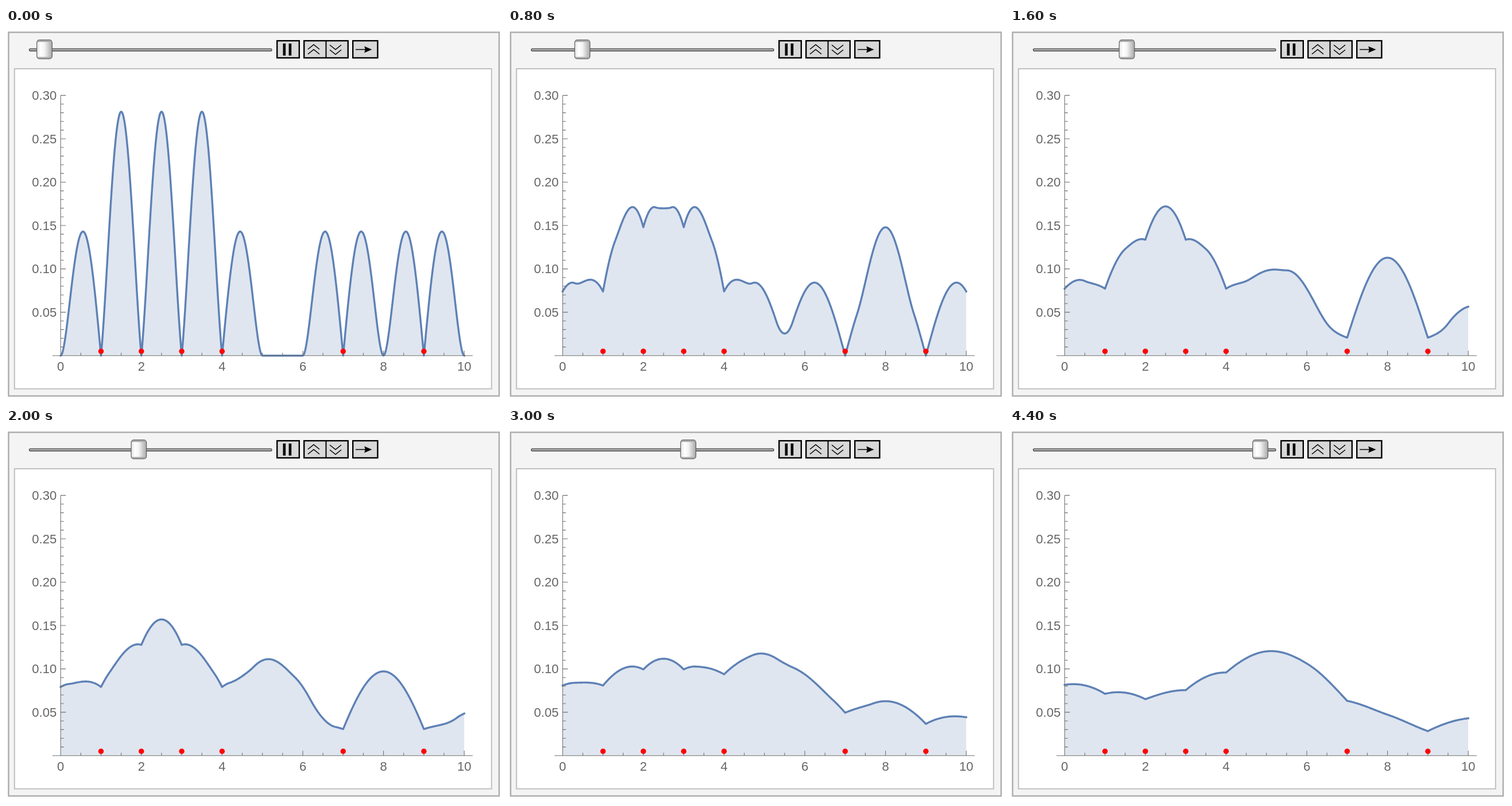
Write an HTML page that moves like this. It is 864 px wide and 648 px high and loops after 4.5 s.

```html
<!DOCTYPE html>
<html lang="en">
<head>
<meta charset="utf-8">
<title>Kernel density</title>
<style>
  html, body { margin: 0; width: 100%; height: 100%; overflow: hidden; background: #fff; }
  svg { display: block; width: 864px; height: 648px; }
  text { font: 22px "Liberation Sans", Arial, sans-serif; fill: #666; }
</style>
</head>
<body>
<svg viewBox="0 0 864 648">
  <defs>
    <linearGradient id="knob">
      <stop offset="0" stop-color="#e2e2e2"/>
      <stop offset=".25" stop-color="#fff"/>
      <stop offset=".5" stop-color="#f4f4f4"/>
      <stop offset="1" stop-color="#a8a8a8"/>
    </linearGradient>
  </defs>

  <rect x="4.5" y="7.5" width="854.5" height="633.5" fill="#f4f4f4" stroke="#acacac" stroke-width="2.4"/>
  <rect x="14.8" y="71" width="831" height="557.5" fill="#fff" stroke="#c0c0c0" stroke-width="2"/>

  <rect x="40.5" y="36.2" width="422.5" height="3.8" rx="1.9" fill="#b4b4b4" stroke="#444" stroke-width="1.3"/>
  <g id="thumb">
    <rect x="-13.3" y="20.8" width="26.6" height="33" rx="4.5" fill="#a9a9a9"/>
    <rect x="-13.3" y="24.2" width="26.6" height="26.2" rx="2.5" fill="url(#knob)"/>
    <rect x="-13.3" y="20.8" width="26.6" height="33" rx="4.5" fill="none" stroke="#555" stroke-width="1.1"/>
  </g>

  <g fill="#d8d8d8" stroke="#000" stroke-width="2.4">
    <rect x="472.2" y="22.2" width="38.6" height="29.8"/>
    <rect x="519.2" y="22.2" width="76.6" height="29.8"/>
    <rect x="604.2" y="22.2" width="43.2" height="29.8"/>
    <path d="M557.5 22V52" stroke-width="2"/>
  </g>
  <path d="M482.5 27h4.6v21h-4.6zM492.6 27h4.6v21h-4.6z"/>
  <path d="M526 37l10-8 10 8M526 45.5l10-8 10 8M564 29.5l10 8 10-8M564 38l10 8 10-8M609 37.5H630"
        fill="none" stroke="#000" stroke-width="1.6"/>
  <path d="M637.5 37.5L624 31.8Q627 37.5 624 43.2Z"/>

  <path id="area" fill="#dfe6f0"/>
  <path id="line" fill="none" stroke="#5e81b5" stroke-width="3.4" stroke-linejoin="round" stroke-linecap="square"/>
  <path id="axes" fill="none" stroke="#707070" stroke-width="1.1"/>
  <g id="labels"></g>
  <g id="dots" fill="#f00"></g>
</svg>

<script>
const data = [1, 2, 3, 4, 7, 9];
const px = x => 95.2 + 70.3 * x;
const py = y => 570.7 - 1511 * y;
const $ = id => document.getElementById(id);

// Thumb centre at some steps: [step, x]
const stops = [[0, 67], [7, 129.5], [15, 203.5], [22, 268.5], [27, 314], [35, 388], [40, 436]];

function add(parent, tag, attrs, text = "") {
  const el = document.createElementNS("http://www.w3.org/2000/svg", tag);
  for (const key in attrs) el.setAttribute(key, attrs[key]);
  el.textContent = text;
  $(parent).append(el);
}

function drawAxes() {
  let d = `M81 ${py(0)}H813M${px(0)} ${py(0)}V${py(0.3)}`;
  for (let i = 0; i <= 30; i++) {
    const major = i % 5 === 0;
    d += `M${px(0)} ${py(i / 100)}h${major ? 9 : 5.5}`;
    if (major && i) {
      add("labels", "text", { x: 88.2, y: py(i / 100) + 7.8, "text-anchor": "end" }, (i / 100).toFixed(2));
    }
  }
  for (let i = 0; i <= 20; i++) {
    const major = i % 4 === 0;
    d += `M${px(i / 2)} ${py(0)}v${major ? -8.5 : -5}`;
    if (major) add("labels", "text", { x: px(i / 2), y: 596.6, "text-anchor": "middle" }, i / 2);
  }
  $("axes").setAttribute("d", d);
  for (const x of data) add("dots", "circle", { cx: px(x), cy: py(0.005), r: 4.7 });
}

const kernel = u => Math.abs(u) < 1 ? 3 * Math.abs(u) * (1 - u * u) ** 2 : 0;

const density = (x, h) =>
  data.reduce((sum, c) => sum + kernel((x - c) / h), 0) / (data.length * h);

function thumbX(step) {
  const i = Math.max(1, stops.findIndex(s => s[0] >= step));
  const [a, xa] = stops[i - 1], [b, xb] = stops[i];
  return xa + (xb - xa) * (step - a) / (b - a);
}

function draw(step) {
  const h = 1 + step / 10;
  const points = [];
  for (let i = 0; i <= 500; i++) {
    const x = i / 50;
    points.push(px(x).toFixed(2) + " " + py(density(x, h)).toFixed(2));
  }
  const d = "M" + points.join("L");
  $("line").setAttribute("d", d);
  $("area").setAttribute("d", `${d}V${py(0)}H${px(0)}Z`);
  $("thumb").setAttribute("transform", `translate(${thumbX(step)} 0)`);
}

let shown = -1;
const start = performance.now();

function tick() {
  const n = Math.floor(Math.max(0, performance.now() - start) % 4500 / 100);
  const step = n - Math.floor((n + 5) / 11); // one tick in eleven holds
  if (step !== shown) draw(shown = step);
  requestAnimationFrame(tick);
}

drawAxes();
tick();
</script>
</body>
</html>
```
